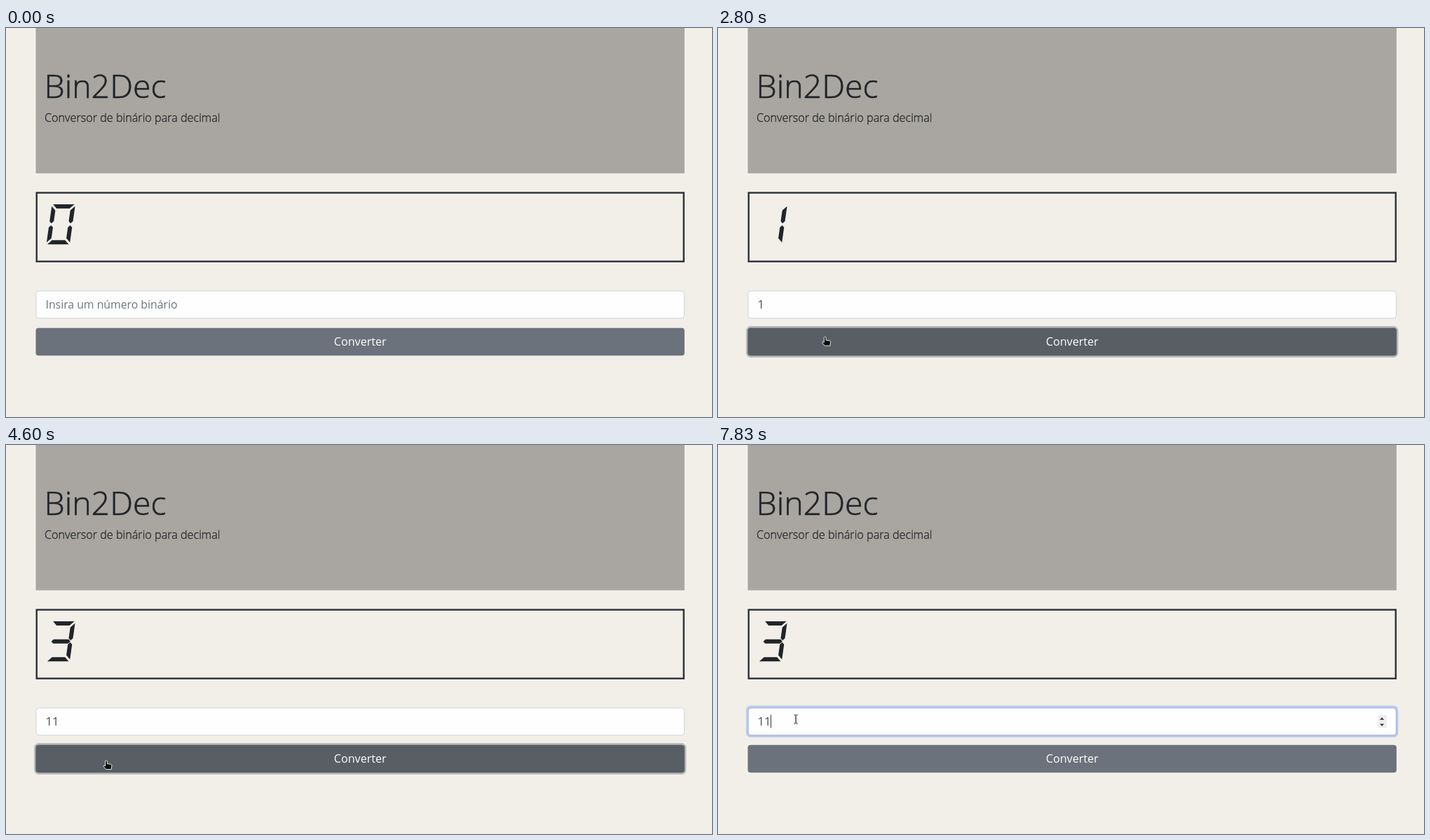
These frames come from a looping animation (1007 by 556 pixels, 8000 ms). An HTML page:

```html
<!DOCTYPE html>
<html lang="pt">
<head>
<meta charset="utf-8">
<title>Bin2Dec</title>
<style>
  html, body { margin: 0; width: 100%; height: 100%; overflow: hidden; background: #f1efe7; }
  svg { display: block; }
  text { font-family: "Open Sans", "Noto Sans", sans-serif; font-size: 16px; }
  .light { font-weight: 300; fill: #212529; stroke: #212529; stroke-width: .3px; }
</style>
</head>
<body>
<svg width="1007" height="556" viewBox="0 0 1007 556">
  <rect width="1007" height="556" fill="#f1efe7"/>
  <rect x="42.5" y="-1" width="925.3" height="208.7" fill="#a9a6a1"/>
  <text class="light" x="54.5" y="99.5" style="font-size:46.5px;stroke-width:.6px">Bin2Dec</text>
  <text class="light" x="55" y="134" style="font-size:16.2px">Conversor de binário para decimal</text>

  <rect x="43.7" y="235.5" width="923" height="98.2" fill="none" stroke="#2b303a" stroke-width="2.4"/>
  <path id="digit" fill="#212529"/>

  <rect id="inputRing" x="40" y="372.5" width="930.3" height="45.5" rx="6.5" fill="#bfcbec"/>
  <rect x="43" y="375.8" width="924.4" height="39" rx="4" fill="#fefefe" stroke="#ced4da"/>
  <rect id="inputEdge" x="43" y="375.8" width="924.4" height="39" rx="4" fill="none" stroke="#9aaee2"/>
  <text id="hint" x="56.5" y="401" fill="#6c757d" style="font-size:15.8px">Insira um número binário</text>
  <text id="value" x="56.5" y="401" fill="#495057" style="font-size:16.5px"></text>
  <rect id="caret" y="385.5" width="1" height="19" fill="#343a40"/>
  <g id="spinner">
    <rect x="941" y="386" width="13" height="18.5" rx="1" fill="#efefef"/>
    <path d="M943.8 392.8h6.4l-3.2-3.6zM943.8 398.4h6.4l-3.2 3.6z" fill="#3c3c3c"/>
  </g>

  <rect id="buttonRing" x="40" y="426" width="930.3" height="45" rx="6.5" fill="#b9bbbb"/>
  <rect x="42.5" y="428.8" width="925.3" height="39.5" rx="4" fill="#6c727b"/>
  <rect id="buttonDark" x="42.5" y="428.8" width="925.3" height="39.5" rx="4" fill="#585e64"/>
  <text x="505.2" y="454" fill="#fff" text-anchor="middle" style="font-size:16.1px">Converter</text>

  <path id="arrow" d="M.5 .5V14L3.6 11.2L5.8 16.2L8 15.2L5.9 10.4H10.3Z" fill="#111" stroke="#fff" stroke-width=".9"/>
  <g id="beam" fill="none">
    <path d="M-2.5-6H2.5M0-6V6M-2.5 6H2.5" stroke="#e6e6e6" stroke-width="3.4"/>
    <path d="M-2.5-6H-.6M.6-6H2.5M0-5.5V5.5M-2.5 6H-.6M.6 6H2.5" stroke="#222" stroke-width="1.1"/>
  </g>
  <path id="hand" d="M-1.4 .6Q0-1 1.3 .6V4.6L6.3 5.3Q8 5.6 7.9 7.3L7.2 12.6H-.4L-3.7 8.6Q-4.4 7.2-3 6.8L-1.4 7.8Z"
    fill="#0c0c0c" stroke="#fff" stroke-width=".9" stroke-linejoin="round"/>
</svg>
<script>
const LOOP = 8000, FADE = 150, BLINK = 600;
const el = id => document.getElementById(id);
const show = (id, on) => el(id).setAttribute('visibility', on ? 'visible' : 'hidden');
const alpha = (id, v) => el(id).setAttribute('opacity', v);

// Clicks land in turn on the input and the button; the result follows on release
const CLICKS = [930, 2410, 3400, 4430, 5430];
const KEYS = [1600, 3770];
const RELEASE = 90;
const RESULTS = [0, 1, 3];

// Pointer glides: start, end, and the hot spot reached
const GLIDES = [
  [400, 400, 70, 361], [600, 700, 100, 395], [1900, 2120, 164, 451],
  [2800, 2800, 153, 442], [2800, 2900, 121, 397], [3100, 3100, 108, 376],
  [4030, 4030, 118, 430], [4030, 4160, 143, 451],
  [5030, 5300, 111, 394], [5730, 5730, 111, 392]
];

// Seven segments: one bar, half bar and middle bar, mirrored into place
const BOX = { l: 57.5, r: 90.8, t: 252, b: 309.3 };
const THICK = 6, GAP = 1.4, SLANT = 0.142;
const DIGITS = { 0: 'abcdef', 1: 'bc', 3: 'abcdg' };

function segment(key) {
  const { l, r, t, b } = BOX, mid = (t + b) / 2, h = THICK / 2;
  const bar = [[l + GAP, t], [r - GAP, t], [r - GAP - THICK, t + THICK], [l + GAP + THICK, t + THICK]];
  const half = [
    [r, t + 2 * GAP], [r, mid - GAP - h], [r - h, mid - GAP],
    [r - THICK, mid - GAP - h], [r - THICK, t + 2 * GAP + THICK]
  ];
  const middle = [
    [l + h, mid], [l + THICK, mid - h], [r - THICK, mid - h],
    [r - h, mid], [r - THICK, mid + h], [l + THICK, mid + h]
  ];
  const shape = key === 'g' ? middle : 'ad'.includes(key) ? bar : half;
  const points = shape.map(([x, y]) => {
    if ('ef'.includes(key)) x = l + r - x;
    if ('cde'.includes(key)) y = t + b - y;
    return [x + (b - y) * SLANT, y];
  });
  return 'M' + points.join('L') + 'Z';
}

const digitPath = n => [...DIGITS[n]].map(segment).join('');

const countPast = (t, times) => times.filter(x => t >= x).length;

// Opacity of a state that switches on and off at the given times
function level(t, toggles) {
  return toggles.reduce((sum, at, i) => {
    const k = Math.min(1, Math.max(0, (t - at) / FADE));
    return sum + (i % 2 ? -1 : 1) * k * k * (3 - 2 * k);
  }, 0);
}

function pointer(t) {
  let p = null;
  for (const [from, to, x, y] of GLIDES) {
    if (t < from) break;
    const k = t >= to ? 1 : (t - from) / (to - from);
    p = p ? [p[0] + (x - p[0]) * k, p[1] + (y - p[1]) * k] : [x, y];
  }
  return p;
}

function pointerShape(t) {
  const p = pointer(t);
  if (!p) return '';
  const inside = (top, bottom) => p[1] >= top && p[1] < bottom;
  return inside(429, 469) ? 'hand' : inside(375.5, 415) ? 'beam' : 'arrow';
}

function render(t) {
  const clicks = countPast(t, CLICKS);
  const typed = '1'.repeat(countPast(t, KEYS));
  const buttonClicks = CLICKS.filter((_, i) => i % 2);
  const result = RESULTS[countPast(t - RELEASE, buttonClicks)];
  const focus = level(t, CLICKS);
  const lastInput = Math.max(...[...CLICKS, ...KEYS].filter(x => x <= t));
  const blinkOn = Math.floor((t - lastInput) / BLINK) % 2 === 0;

  el('digit').setAttribute('d', digitPath(result));
  el('value').textContent = typed;
  show('hint', !typed);
  alpha('inputRing', focus);
  alpha('inputEdge', focus);
  alpha('buttonRing', level(t, CLICKS.slice(1)));
  alpha('buttonDark', level(t, [2050, CLICKS[2], 4030, CLICKS[4]]));
  show('spinner', pointerShape(t - 30) === 'beam');
  show('caret', clicks % 2 && blinkOn);
  el('caret').setAttribute('x', 57 + 9 * typed.length);

  const shape = pointerShape(t);
  for (const id of ['arrow', 'beam', 'hand']) show(id, id === shape);
  if (shape) el(shape).setAttribute('transform', `translate(${pointer(t)})`);
}

const start = performance.now();
function tick() {
  render((performance.now() - start) % LOOP);
  requestAnimationFrame(tick);
}
tick();
</script>
</body>
</html>
```
